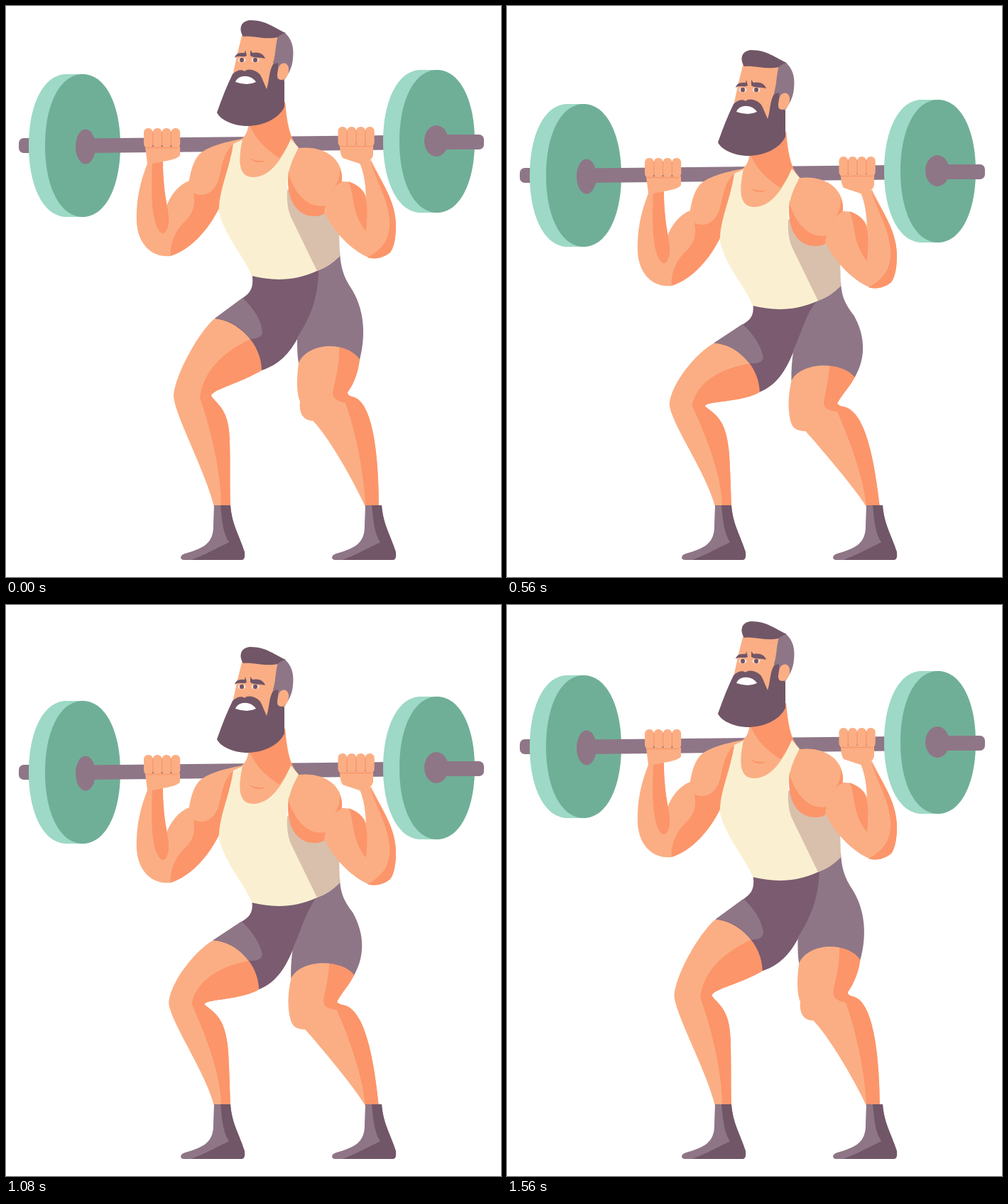
An HTML page with a canvas for the animation above (1600 ms loop, 697 by 804 pixels).

```html
<!DOCTYPE html>
<html lang="en">
<head>
<meta charset="utf-8">
<title>Barbell squat</title>
<style>
html, body { margin: 0; width: 100%; height: 100%; overflow: hidden; background: #fff; }
canvas { display: block; }
</style>
</head>
<body>
<canvas id="stage" width="697" height="804"></canvas>
<script>
const ctx = document.getElementById('stage').getContext('2d');
const LOOP = 1600, STEP = 40, DEPTH = 60, LOW = 51;
const SKIN = '#fbae84', SKIN_DARK = '#fc956a', MAUVE = '#8e7687', SHORTS = '#7a5b70',
  HAIR = '#715667', CREAM = '#faf0d1', CREAM_DARK = '#d9c0ac', PLATE = '#70af97', RIM = '#9dd9c6';

// Each leg shape has a standing path and a path at a drop of LOW pixels.
const legs = [
  [SKIN,
    'M294 440C275 455 239 515 236 549C237 575 281 655 293 705L316 705C315 680 316 650 315 612C314 568 299 563 289 549C290 540 330 531 360 513C370 485 345 430 294 440Z',
    'M291 482C262 498 230 535 227 563C229 590 282 660 293 705L316 705C315 680 314 650 312 630C307 587 295 580 277 567C276 559 330 565 355 550C368 525 342 472 291 482Z'],
  [SKIN_DARK,
    'M344 469C300 490 277 518 273 552C290 600 303 660 303 705L316 705C315 680 316 650 315 612C314 568 299 563 289 549C290 540 330 531 360 513L365 472Z',
    'M341 511C295 515 263 538 258 565C280 610 303 665 303 705L316 705C315 680 314 650 312 630C307 587 295 580 277 567C276 559 330 565 355 550L362 510Z'],
  [SKIN,
    'M412 503C409 525 409 545 414 557C412 575 420 584 432 584C453 605 487 664 506 705L525 705C525 645 519 555 487 550C484 549 481 548 481 544C490 532 496 515 498 498C485 450 420 450 412 503Z',
    'M398 533C392 558 393 575 396 590C400 600 406 601 418 602C438 625 492 684 506 705L525 705C517 650 504 572 470 567C464 566 461 563 462 562C468 550 480 540 488 528C475 485 405 485 398 533Z'],
  [SKIN_DARK,
    'M469 465C471 510 463 525 460 545C461 555 470 557 478 559C496 610 505 670 506 705L525 705C525 645 519 555 487 550C484 549 481 548 481 544C490 532 496 515 498 498L488 465Z',
    'M452 495C450 535 445 545 443 562C443 571 455 573 462 574C485 622 502 670 506 705L525 705C517 650 504 572 470 567C464 566 461 563 462 562C468 550 480 540 488 528L478 495Z'],
  [SHORTS,
    'M346 376C350 395 344 404 335 410L294 440C326 443 360 475 360 513C385 505 400 488 411 467L450 450L460 365Z',
    'M346 427C349 445 341 451 332 456L291 482C325 484 354 515 355 550C380 540 393 515 403 488L445 480L455 416Z'],
  [MAUVE,
    'M440 370C440 415 427 440 410 467C410 480 410 492 412 503C425 472 482 472 498 498C508 460 503 425 487 399C474 380 471 365 470 346Z',
    'M438 421C415 440 412 465 402 488C399 505 398 520 398 533C412 506 470 506 488 528C507 500 503 470 489 444C477 428 471 420 470 397Z'],
  [MAUVE,
    'M333 411C350 426 361 446 361 461C358 468 351 468 344 469C330 451 315 442 294 440Z',
    'M331 456C346 468 359 490 361 503C359 511 350 511 341 511C327 494 312 483 291 482Z']
];

const sock = [
  [MAUVE, 'M293 703H316C318 730 328 744 336 769Q337 780 332 780H250C244 779 245 773 252 771C276 764 293 758 292 730Z'],
  [HAIR, 'M293 703H316C318 730 328 744 336 769Q337 780 332 780H261C281 772 290 767 314 755C305 742 304 722 302 703Z']
];

const torso = [
  [SKIN, 'M342 155C342 178 338 186 320 194L330 246H375L412 199C400 188 396 165 393 135Z'],
  [SKIN_DARK, 'M342 166C352 188 364 200 385 214L403 188C396 170 394 155 393 135Z'],
  [SKIN_DARK, 'M342 214Q354 225 366 217Q354 220 342 214Z'],
  [SKIN_DARK, 'M322 193C290 200 262 212 258 250L222 310L228 352H232C262 342 285 315 301 283L316 215Z'],
  [SKIN, 'M333 187C305 192 282 199 272 209C263 219 260 234 258 245C257 253 260 260 265 264C280 270 292 262 298 248C304 232 303 212 318 196Z'],
  [SKIN, 'M196 198L199 222C190 245 183 270 184 305C186 335 205 355 232 352C230 334 240 314 252 303C264 292 267 280 264 264L258 246C243 252 231 266 225 285L220 219Q242 216 245 210V198Z'],
  [SKIN_DARK, 'M206 222C205 250 203 290 213 312C218 323 226 324 229 306C231 288 221 270 221 219Z'],
  [CREAM, 'M320 194L333 188C327 215 326 241 348 241C373 241 390 213 401 187L412 200C400 220 394 245 396 268L470 352Q455 367 438 373C405 388 375 387 346 380C338 357 307 323 300 290C299 260 315 230 320 194Z'],
  [CREAM_DARK, 'M396 258C395 275 397 289 402 299L438 373Q456 367 470 352L469 316L440 275Z'],
  [SKIN_DARK, 'M398 232C394 262 402 288 425 295C435 297 446 296 449 291L455 270Z'],
  [SKIN, 'M412 200C448 196 476 215 473 247C490 246 504 258 507 268C506 250 504 235 498 221L514 217C530 250 549 275 549 310C549 330 545 342 541 347C530 356 515 357 508 353C490 345 463 322 448 290L450 281C420 287 402 253 398 235C401 221 406 210 412 200Z'],
  [SKIN_DARK, 'M472 248C466 251 461 255 457 263C465 252 471 243 470 228C473 236 474 242 472 248Z'],
  [SKIN_DARK, 'M482 247C491 263 485 290 507 317C510 282 512 257 482 247Z'],
  [SKIN_DARK, 'M513 219C530 250 549 275 549 310C549 330 545 342 541 347C530 356 517 357 509 354C532 342 542 325 540 300C537 270 521 245 513 219Z'],
  [SKIN, 'M470 195H517V210Q515 220 498 222L474 214Q470 208 470 195Z']
];

const head = [
  [SKIN, 'M333 38L326 66L319 98L365 122L392 105L390 40Z'],
  [MAUVE, 'M383 42L393 38C402 46 406 58 404 74C403 87 398 95 392 104L382 100L376 80C380 68 379 56 383 42Z'],
  [HAIR, 'M334 43C328 34 329 21 344 20C366 20 378 31 394 38C388 40 384 42 383 44C365 48 347 41 334 43Z'],
  [HAIR, 'M319 96C325 90 332 89 336 92C341 87 352 90 358 97C362 104 364 111 367 117C371 105 370 92 376 82L383 80L384 100L392 105V142C384 159 362 169 338 169C317 168 301 159 297 150C304 130 311 112 319 96Z'],
  [SKIN, 'M383 90C384 80 395 76 398 87C399 98 392 107 384 103C381 101 382 95 383 90Z'],
  ['#fff', 'M323 107C327 96 345 96 352 107Q340 113 323 107Z'],
  [HAIR, 'M322 73C324 65 331 66 336 66L337 62L339 70C334 73 328 69 322 73Z'],
  [HAIR, 'M344 70L344 62L347 66C355 64 363 67 365 74C358 72 350 74 344 70Z']
];

function ready(shapes) {
  return shapes.map(([color, d]) => [color, new Path2D(d)]);
}
const sockShapes = ready(sock), torsoShapes = ready(torso), headShapes = ready(head);

function paint(shapes) {
  for (const [color, path] of shapes) {
    ctx.fillStyle = color;
    ctx.fill(path);
  }
}

function ellipse(color, x, y, rx, ry) {
  ctx.fillStyle = color;
  ctx.beginPath();
  ctx.ellipse(x, y, rx, ry, 0, 0, Math.PI * 2);
  ctx.fill();
}

function bar(x1, y1, x2, y2) {
  const h = 10.2;
  ctx.fillStyle = MAUVE;
  ctx.beginPath();
  ctx.moveTo(x1, y1 - h);
  ctx.lineTo(x2, y2 - h);
  ctx.lineTo(x2, y2 + h);
  ctx.lineTo(x1, y1 + h);
  ctx.fill();
}

function stub(x, y, w) {
  ctx.fillStyle = MAUVE;
  ctx.beginPath();
  ctx.roundRect(x, y - 10.5, w, 21, 7);
  ctx.fill();
}

// A disc slightly fuller than an ellipse.
function disc(color, x, y) {
  const rx = 53, ry = 100.5, kx = rx * 0.59, ky = ry * 0.59;
  ctx.fillStyle = color;
  ctx.beginPath();
  ctx.moveTo(x, y - ry);
  for (const [sx, sy] of [[1, 1], [-1, -1]]) {
    ctx.bezierCurveTo(x + sx * kx, y - sy * ry, x + sx * rx, y - sy * ky, x + sx * rx, y);
    ctx.bezierCurveTo(x + sx * rx, y + sy * ky, x + sx * kx, y + sy * ry, x, y + sy * ry);
  }
  ctx.fill();
}

function plate(x, y) {
  disc(RIM, x - 23, y);
  ctx.fillRect(x - 23, y - 100.5, 23, 201);
  disc(PLATE, x, y);
}

function fingers(x, y) {
  ctx.fillStyle = SKIN;
  ctx.strokeStyle = SKIN_DARK;
  ctx.lineWidth = 1.3;
  for (let i = 0; i < 4; i++) {
    ctx.beginPath();
    ctx.roundRect(x + i * 12.8, y, 12.8, 28, 6);
    ctx.fill();
    if (i) {
      ctx.beginPath();
      ctx.moveTo(x + i * 12.8, y + 5);
      ctx.lineTo(x + i * 12.8, y + 24);
      ctx.stroke();
    }
  }
  ctx.beginPath();
  ctx.moveTo(x + 3, y + 27.5);
  ctx.lineTo(x + 48, y + 27.5);
  ctx.stroke();
}

function blend(from, to, k) {
  const ends = to.match(/\d+/g);
  let i = 0;
  return new Path2D(from.replace(/\d+/g, v => +v + (ends[i++] - v) * k));
}

function eye(x) {
  ellipse('#f9dfd0', x, 76, 5.5, 3.6);
  ellipse(HAIR, x, 76, 3, 3.2);
}

function draw(drop) {
  ctx.fillStyle = '#fff';
  ctx.fillRect(0, 0, 697, 804);

  paint(legs.map(([color, from, to]) => [color, blend(from, to, drop / LOW)]));
  paint(sockShapes);
  ctx.save();
  ctx.translate(213, 0);
  paint(sockShapes);
  ctx.restore();

  ctx.save();
  ctx.translate(0, drop);
  stub(18, 196.5, 60);
  plate(108, 196.5);
  bar(112, 196.8, 570, 192);
  plate(607, 190.5);
  stub(607, 191.5, 66);
  ellipse(MAUVE, 112, 198, 14, 24.5);
  ellipse(MAUVE, 606, 190, 17, 22);
  paint(torsoShapes);
  fingers(194, 172);
  fingers(467.5, 170);
  paint(headShapes);
  eye(332);
  eye(351);
  ctx.restore();
}

function frame(now) {
  const t = Math.floor((now % LOOP) / STEP) * STEP;
  draw(DEPTH * (1 - Math.abs(1 - 2 * t / LOOP)));
  requestAnimationFrame(frame);
}
draw(0);
requestAnimationFrame(frame);
</script>
</body>
</html>
```
